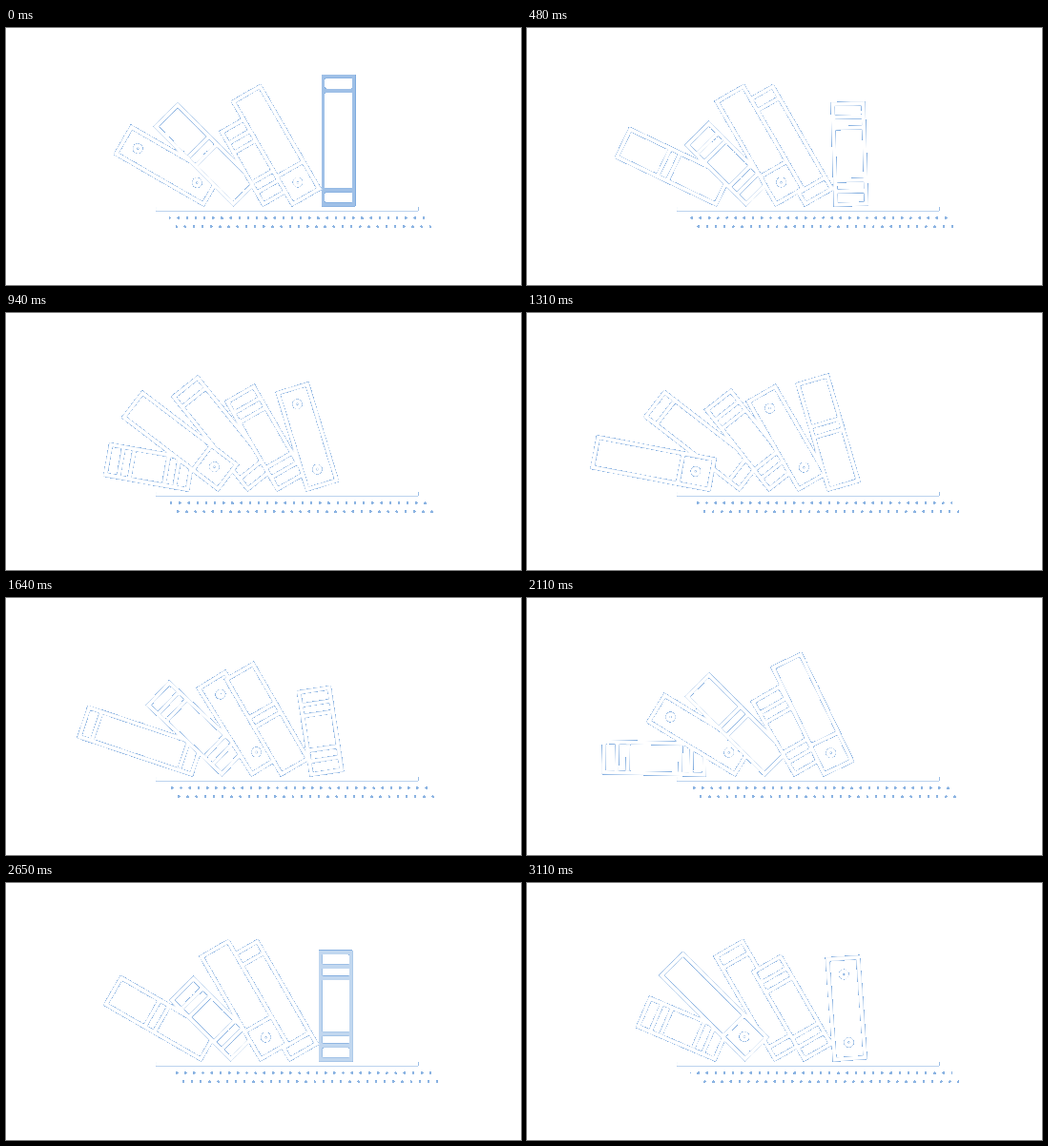
Write an HTML page with a canvas that moves like this. It is 540x270 px and loops after 3210 ms.

```html
<!DOCTYPE html>
<html lang="en">
<head>
<meta charset="utf-8">
<title>Bookshelf loader</title>
<style>
  html, body { margin: 0; width: 100%; height: 100%; overflow: hidden; background: #fff; }
  canvas { display: block; width: 540px; height: 270px; }
</style>
</head>
<body>
<canvas id="stage" width="540" height="270"></canvas>
<script>
const W = 540, H = 270;
const LOOP = 3210, LAST = 3110;      // the final pose is held until the loop ends
const START = 5.67, SPEED = 0.0446;  // percent of a book's journey, and percent per ms
const BLUE = '#1e6cc7', BLUE_RED = 0x1e;
const CUTOFF = 0.42;                 // less white than this counts as background

// The scene is drawn a little larger and scaled down, which softens the edges.
const SCENE_W = 588, ZOOM = W / SCENE_W;
const LEFT = 171, FLOOR = 188 / ZOOM, SHELF_W = 300, TRAVEL = 200;
const THICK = 5, BOOK_W = 40;

const view = document.getElementById('stage').getContext('2d', { willReadFrequently: true });
const scene = document.createElement('canvas');
scene.width = SCENE_W;
scene.height = SCENE_W / 2;
const ctx = scene.getContext('2d');

const ramp = (p, from, to) => Math.min(1, Math.max(0, (p - from) / (to - from)));
const lean = p => 30 * ramp(p, 10, 17.6) + 15 * ramp(p, 45, 49.5)
  + 15 * ramp(p, 61.5, 67) + 30 * ramp(p, 76, 83.5);
const stretch = p => 1 + 0.1 * (ramp(p, 0, 6.5) - ramp(p, 6.5, 8.8));
const fade = p => ramp(p, 0, 10) - ramp(p, 83.5, 90);

// Bars and rings are measured from the inner top; mirrored books repeat them below.
const band = y => [y, y + 12.5];
const books = [
  { h: 140, bars: [10], mirror: true },
  { h: 120, bars: band(10), mirror: true },
  { h: 120, rings: [16], mirror: true },
  { h: 130, bars: band(46) },
  { h: 100, bars: band(10), mirror: true },
  { h: 140, bars: [94], rings: [114] }
];

function hole(x, y, w, h) {
  ctx.moveTo(x, y);
  ctx.lineTo(x, y + h);
  ctx.lineTo(x + w, y + h);
  ctx.lineTo(x + w, y);
  ctx.closePath();
}

function circle(x, y, r, reverse = false) {
  ctx.moveTo(x + r, y);
  ctx.arc(x, y, r, 0, Math.PI * 2, reverse);
  ctx.closePath();
}

function drawBook({ h, bars = [], rings = [], mirror }, p) {
  const alpha = fade(p);
  if (alpha <= 0) return;
  const innerW = BOOK_W - 2 * THICK, innerH = h - 2 * THICK, top = THICK - h;
  const bar = y => ctx.rect(THICK, top + y, innerW, THICK);
  const ring = y => {
    circle(BOOK_W / 2, top + y, 6);
    circle(BOOK_W / 2, top + y, 1, true);
  };

  ctx.save();
  ctx.globalAlpha = alpha;
  ctx.translate(LEFT + TRAVEL * (1 - p / 100), FLOOR);
  ctx.rotate(-lean(p) * Math.PI / 180);
  ctx.scale(1, stretch(p));

  ctx.fillStyle = BLUE;
  ctx.fillRect(THICK - 1, top - 1, innerW + 2, innerH + 2);

  ctx.fillStyle = '#fff';
  ctx.beginPath();
  ctx.rect(0, -h, BOOK_W, h);
  hole(THICK, top, innerW, innerH);
  bars.forEach(bar);
  rings.forEach(ring);
  if (mirror) {
    bars.forEach(y => bar(innerH - y - THICK));
    rings.forEach(y => ring(innerH - y));
  }
  ctx.fill();
  ctx.restore();
}

function drawDots(indent, top, shift) {
  const x = LEFT + SHELF_W * indent, y = FLOOR + top;
  ctx.save();
  ctx.beginPath();
  ctx.rect(x, y, SHELF_W, 10);
  ctx.clip();
  ctx.fillStyle = 'rgba(255,255,255,.5)';
  ctx.beginPath();
  for (let dx = shift - 5; dx < SHELF_W + 5; dx += 10) circle(x + dx, y + 2.5, 2.12);
  ctx.fill();
  ctx.restore();
}

// Turn the blue ground white, leaving only the soft edges.
function knockOut() {
  const img = view.getImageData(0, 0, W, H), d = img.data;
  const limit = BLUE_RED + (255 - BLUE_RED) * CUTOFF;
  for (let i = 0; i < d.length; i += 4) {
    if (d[i] < limit) d[i] = d[i + 1] = d[i + 2] = 255;
  }
  view.putImageData(img, 0, 0);
}

function draw(t) {
  const progress = START + SPEED * t;
  ctx.fillStyle = BLUE;
  ctx.fillRect(0, 0, scene.width, scene.height);
  books.forEach((book, i) => drawBook(book, (progress + 100 - i * 100 / 6) % 100));
  drawDots(0.05, 10, progress % 10);
  drawDots(0.075, 20, progress % 10);

  view.drawImage(scene, 0, 0, W, H);
  view.fillStyle = '#fff';
  view.fillRect(LEFT * ZOOM, FLOOR * ZOOM, SHELF_W * ZOOM, 4.7);
  knockOut();
}

function tick() {
  draw(Math.min(performance.now() % LOOP, LAST));
  requestAnimationFrame(tick);
}
tick();
</script>
</body>
</html>
```
